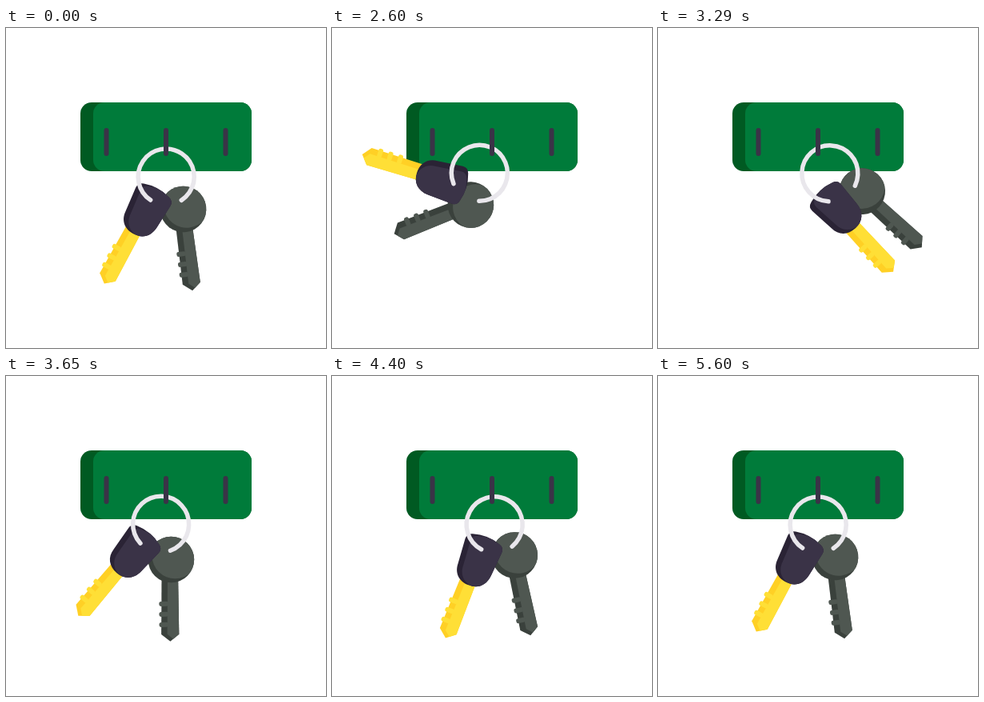
An HTML page with a canvas for the animation above (5660 ms loop, 400 by 400 pixels).

```html
<!DOCTYPE html>
<html lang="en">
<head>
<meta charset="utf-8">
<title>Swinging keys</title>
<style>
html, body { margin: 0; width: 100%; height: 100%; overflow: hidden; background: #fff; }
canvas { display: block; }
</style>
</head>
<body>
<canvas id="stage" width="400" height="400"></canvas>
<script>
const ctx = document.getElementById('stage').getContext('2d');
const LOOP = 5660, HOLD = 2030, LAST = 5600, STEP = 30;
const RAD = Math.PI / 180;

const GREEN = ['#007b3a', '#005a22'];
const PLUM = ['#3a3347', '#2a2335'];
const YELLOW = ['#ffdf36', '#ffd025'];
const GRAY = ['#4f5751', '#3a413c'];
const SILVER = '#e9e7ec';

// Swing extremes as [time in ms, degrees]; each key turns independently of the ring.
const swings = {
  ring: [[1990, 0], [2500, 37], [3220, -33], [3780, 20], [4370, -6], [4860, 5], [5600, 0]],
  yellow: [[1990, 0], [2590, 78.5], [3290, -71.3], [3860, 47], [4390, -7], [4880, 7], [5480, 0]],
  gray: [[1990, 0], [2600, 75.8], [3310, -40.5], [3870, 31], [4430, -5], [5400, 0]]
};

function swingAt(keys, time) {
  if (time <= keys[0][0]) return keys[0][1];
  for (let i = 1; i < keys.length; i++) {
    const [t0, a] = keys[i - 1], [t1, b] = keys[i];
    if (time < t1) return a + (b - a) * (1 - Math.cos(Math.PI * (time - t0) / (t1 - t0))) / 2;
  }
  return 0;
}

function roundRect(x, y, w, h, r, color) {
  ctx.fillStyle = color;
  ctx.beginPath();
  ctx.roundRect(x, y, w, h, r);
  ctx.fill();
}

function rotateAbout(x, y, degrees) {
  ctx.translate(x, y);
  ctx.rotate(degrees * RAD);
  ctx.translate(-x, -y);
}

// Fills a path with its shade, then its main colour shifted within it.
function shaded(path, [main, shade], dx, dy = 0) {
  ctx.save();
  ctx.fillStyle = shade;
  ctx.fill(path);
  ctx.clip(path);
  ctx.translate(dx, dy);
  ctx.fillStyle = main;
  ctx.fill(path);
  ctx.restore();
}

function blade(top, tip, colors) {
  const path = new Path2D();
  path.moveTo(-11, top);
  path.lineTo(9.5, top);
  path.lineTo(10.2, tip - 9);
  path.lineTo(-0.8, tip);
  path.lineTo(-12, tip - 9);
  path.closePath();
  shaded(path, colors, 7.5);
  for (const offset of [47, 34, 21]) {
    roundRect(-14.5, tip - offset - 3, 11.5, 6, 2.5, colors[0]);
  }
}

const grip = new Path2D(
  'M-17-13 Q1-19 19-13 Q26-11 25.5-4 L23.5 27 C22.5 41 14 48.5 1.5 48.5 ' +
  'C-11 48.5-20 41-20.5 28 L-23.5-4 Q-24-11-17-13Z');
const bow = new Path2D();
bow.arc(1, 11.7, 28.8, 0, 2 * Math.PI);

function hangKey(x, y, degrees, draw) {
  ctx.save();
  ctx.translate(x, y);
  ctx.rotate(degrees * RAD);
  draw();
  ctx.restore();
}

function drawHook(x) {
  roundRect(x - 3, 125, 6, 35, 3, PLUM[0]);
}

function drawBoard() {
  roundRect(93, 93, 214, 86, 14, GREEN[1]);
  roundRect(109, 93, 198, 86, 14, GREEN[0]);
  drawHook(125.5);
  drawHook(274.5);
}

function drawKeys(time) {
  const ring = swingAt(swings.ring, time);
  ctx.save();
  rotateAbout(200, 157.5, ring);

  hangKey(219, 215, swingAt(swings.gray, time) - ring - 7.5, () => {
    blade(30, 114, GRAY);
    shaded(bow, GRAY, 5, -5);
  });
  hangKey(181, 214, swingAt(swings.yellow, time) - ring + 28.5, () => {
    blade(40, 120.5, YELLOW);
    shaded(grip, PLUM, 7);
  });

  ctx.strokeStyle = SILVER;
  ctx.lineWidth = 5.5;
  ctx.lineCap = 'round';
  ctx.beginPath();
  ctx.arc(200.2, 186, 35, 124 * RAD, 417 * RAD);
  ctx.stroke();
  ctx.restore();
}

function render(now) {
  const t = now % LOOP;
  const time = t < HOLD ? 0 : Math.min(LAST, HOLD + Math.floor((t - HOLD) / STEP) * STEP);
  ctx.fillStyle = '#fff';
  ctx.fillRect(0, 0, 400, 400);
  drawBoard();
  drawKeys(time);
  drawHook(200);
}

const start = performance.now();
function loop() {
  render(Math.max(0, performance.now() - start));
  requestAnimationFrame(loop);
}
loop();
</script>
</body>
</html>
```
